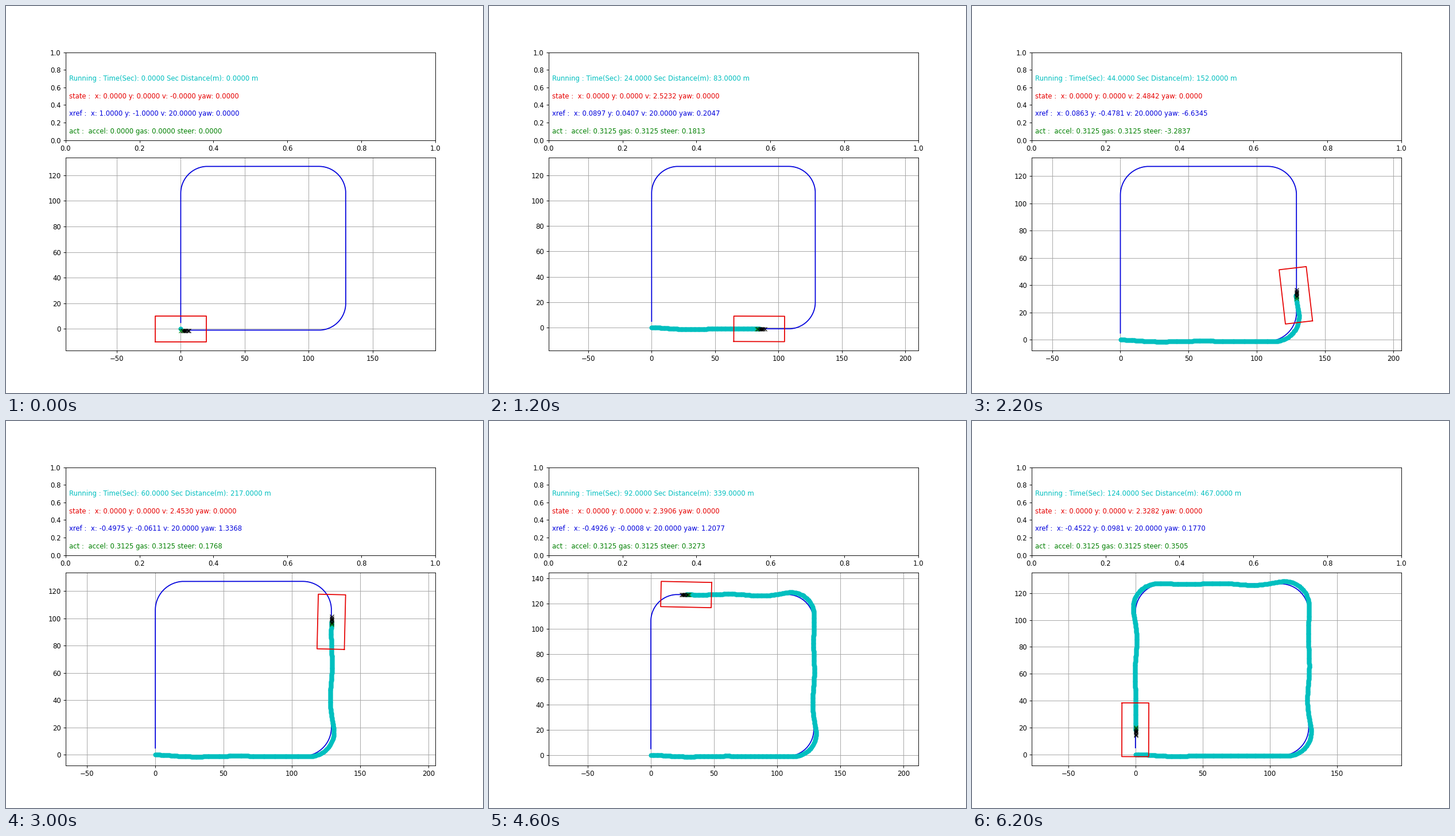
Animation of 831 by 674 pixels, one loop 6400 ms. Source, as a matplotlib script:

```python
import numpy as np
import matplotlib.pyplot as plt
from matplotlib.animation import FuncAnimation

WIDTH, HEIGHT, DPI = 831, 674, 84
FRAMES, STEP_MS = 32, 200
SECONDS_PER_FRAME = 4
RED, BLUE, GRID = "#e60000", "#0000dc", "#a4a4a4"

# Course: straights joined by quarter turns, integrated from its heading.
ARC = 21 * np.pi / 2
breaks = np.cumsum([0, 108, ARC, 86, ARC, 87, ARC, 101])
DS = 0.05
s_grid = np.arange(0, breaks[-1] + DS, DS)
course_yaw = np.radians(np.interp(s_grid, breaks, [0, 0, 90, 90, 180, 180, 270, 270]))
course_x = np.cumsum(np.cos(course_yaw)) * DS
course_y = np.cumsum(np.sin(course_yaw)) * DS - 1


def settle(s):
    """The car starts inside the course and swings onto it."""
    w = np.pi / 30
    return -np.exp(-s / 30) * (np.cos(w * s) + np.sin(w * s) / (30 * w))


def overshoot(s):
    """Damped swing to the outside after a corner begins."""
    s = np.maximum(s, 0)
    return 6 * np.exp(-s / 30) * np.sin(np.pi * (s / 42) ** 1.4)


drift = settle(s_grid) + sum(overshoot(s_grid - corner) for corner in breaks[1:6:2])
car_x = course_x + drift * np.sin(course_yaw)
car_y = course_y - drift * np.cos(course_yaw)
car_yaw = np.unwrap(np.arctan2(np.gradient(car_y), np.gradient(car_x)))


def at(s, *curves):
    return [np.interp(s, s_grid, c) for c in curves]


def box_outline(x, y, yaw):
    along = np.array([-20, 20, 20, -20, -20])
    across = np.array([-10, -10, 10, 10, -10])
    c, s = np.cos(yaw), np.sin(yaw)
    return x + along * c - across * s, y + along * s + across * c


def readout(frame, s):
    """Reference x, y and yaw as seen from the car, speed, accel and steer."""
    if frame == 0:
        return 1, -1, 0, -0.0, 0, 0
    y, ref, yaw = at(s, drift, course_yaw, car_yaw)
    yaw_error = np.degrees(ref - yaw)
    x = -.2 + .3 * np.sin(2.4 * frame)
    steer = 3.08 * y + .273 * yaw_error
    return x, y, yaw_error, 2.57 - .0078 * frame, .3125, steer


# The tiny margin keeps the pixel size from being truncated.
fig = plt.figure(figsize=((WIDTH + 1e-6) / DPI, (HEIGHT + 1e-6) / DPI), dpi=DPI)
info = plt.subplot2grid((3, 1), (0, 0))
track = plt.subplot2grid((3, 1), (1, 0), rowspan=2)
lines = [info.text(.01, y, "", color=color, va="center")
         for y, color in zip((.7, .5, .3, .1), ("c", RED, BLUE, "g"))]


def draw(frame):
    seconds = frame * SECONDS_PER_FRAME
    distance = round(np.interp(seconds, [0, 44, 60, 76, 92, 124],
                               [0, 152, 217, 277, 339, 467]))
    target = distance * .997
    s = target + 2 * min(frame, 1)
    x, y, yaw, speed, accel, steer = readout(frame, s)

    messages = (
        f"Running : Time(Sec): {seconds:.4f} Sec Distance(m): {distance:.4f} m",
        f"state :  x: {0:.4f} y: {0:.4f} v: {speed:.4f} yaw: {0:.4f}",
        f"xref :  x: {x:.4f} y: {y:.4f} v: {20:.4f} yaw: {yaw:.4f}",
        f"act :  accel: {accel:.4f} gas: {accel:.4f} steer: {steer:.4f}",
    )
    for line, message in zip(lines, messages):
        line.set_text(message)

    track.cla()
    track.plot(course_x[::5], course_y[::5], color=BLUE)
    trail = np.append(np.arange(0, s, .8), s)
    track.plot(*at(trail, car_x, car_y), "oc")
    track.plot(*at(target + np.arange(1, 7), course_x, course_y), "xk")
    track.plot(*at([target], course_x, course_y), "xg")
    px, py, ref = at(s, car_x, car_y, course_yaw)
    track.plot(*box_outline(px, py, ref - np.radians(yaw)), color=RED)
    track.axis("equal")
    track.grid(True, color=GRID)
    return lines


anim = FuncAnimation(fig, draw, frames=FRAMES, interval=STEP_MS,
                     init_func=lambda: lines, repeat=True, repeat_delay=0)
plt.show()
```
